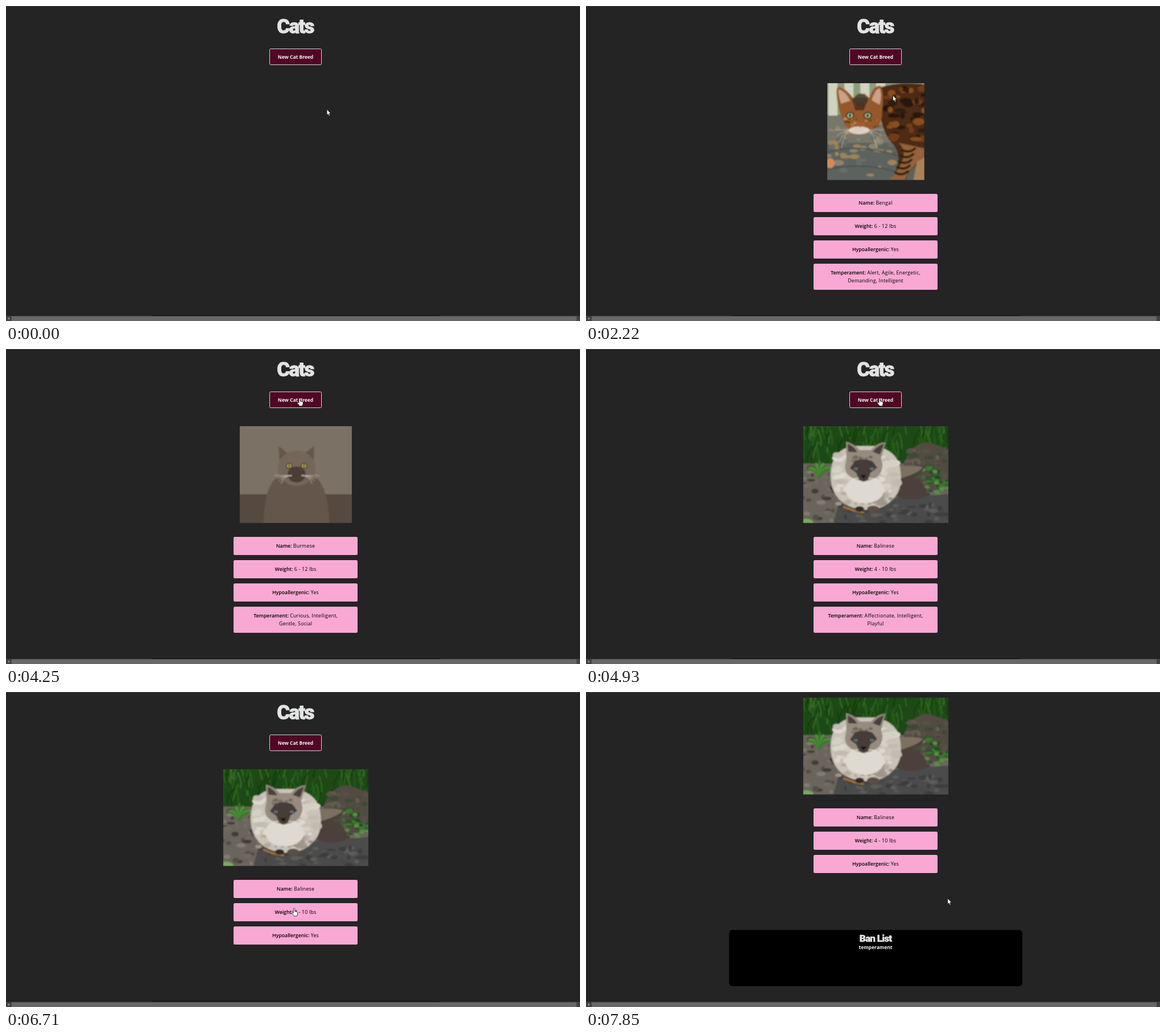
Recreate the animation shown at these times as an HTML page. Size 1009x555 px, loop 8 s.

```html
<!DOCTYPE html>
<html lang="en">
<head>
<meta charset="utf-8">
<title>Cats</title>
<style>
  html, body { margin: 0; width: 100%; height: 100%; overflow: hidden; background: #242424; }
  svg { display: block; overflow: hidden; }
  text { text-anchor: middle; font: 600 8.75px "Open Sans", "Noto Sans", sans-serif; }
  .button { font-size: 8.5px; font-weight: 700; fill: #f6f2f4; }
  .value { font-weight: 400; letter-spacing: .24px; }
  .display { font: 900 35px Roboto, sans-serif; letter-spacing: -1.7px; fill: #e2e4e4;
    stroke: #e2e4e4; stroke-width: .8; stroke-linejoin: round; }
  .small { font-size: 17px; letter-spacing: -.7px; stroke-width: .5; }
  #cursor path { fill: #fff; stroke: #111; stroke-width: .8; stroke-linejoin: round; }
</style>
</head>
<body>
<svg width="100%" height="100%" viewBox="0 0 1009 555">
  <filter id="soft"><feGaussianBlur stdDeviation=".8"/></filter>
  <rect width="1009" height="555" fill="#242424"/>
  <g id="page">
    <text class="display" x="508.5" y="47.8">Cats</text>
    <rect x="463.5" y="75.5" width="91" height="28" rx="2" fill="#500724" stroke="#d8d4d6"/>
    <text class="button" x="509" y="93">New Cat Breed</text>
    <g id="photos"></g>
    <g id="cards"></g>
    <rect x="251.5" y="545.2" width="515.5" height="99" rx="6"/>
    <text class="display small" x="509" y="565.5">Ban List</text>
    <text class="button" id="banned" x="509" y="579">temperament</text>
  </g>
  <rect width="1009" height="1" fill="#404040"/>
  <rect y="546" width="1009" height="9" fill="#424242"/>
  <rect x="10" y="546.7" width="993" height="8.3" fill="#686868"/>
  <path d="M6 548.6v4.4l-3-2.2z" fill="#9a9a9a"/>
  <g id="cursor">
    <path id="arrow" d="M0 0V10.2l2.3-2 1.5 3.5 1.8-.8-1.5-3.4h2.9z"/>
    <path id="hand" d="M-1.2 1.2a1.2 1.2 0 0 1 2.4 0V5.5l3.6.8q1.6.5 1.5 2l-.6 3q-.3 1.3-.8 2.6h-5q-.5-1.3-1.6-2.4l-2-2.3q-.8-1.2.2-1.7 .9-.4 2.3 1z"/>
  </g>
</svg>
<script>
const LOOP = 8000, STEP = 120;
const BAN_TIME = 6320, SCROLL_TIME = 7610, SCROLL_END = 126;
const $ = id => document.getElementById(id);

// Pointer strokes from its resting place: start time, steps, destination
const strokes = [
  { t: 150, n: 2, x: 539, y: 116 },
  { t: 420, n: 1, x: 520, y: 87 },
  { t: 1170, n: 2, x: 535, y: 95 },
  { t: 1860, n: 3, x: 577, y: 269 },
  { t: 2220, n: 4, x: 512, y: 76 },
  { t: 2700, n: 3, x: 511, y: 86 },
  { t: 3220, n: 1, x: 522, y: 98 },
  { t: 3860, n: 4, x: 516, y: 86.5 },
  { t: 5050, n: 3, x: 556, y: 346 },
  { t: 5690, n: 5, x: 503, y: 472 },
  { t: 6470, n: 3, x: 506.5, y: 381 },
  { t: 6830, n: 4, x: 528, y: 118 },
  { t: 7370, n: 3, x: 653.5, y: 322 },
  { t: 7730, n: 2, x: 635.7, y: 363.5 }
];

const breeds = [
  { from: 1470, photoFrom: 1590, width: 170.5, draw: bengal,
    rows: ["Bengal", "6 - 12 lbs", "Yes", "Alert, Agile, Energetic,"], more: "Demanding, Intelligent" },
  { from: 3460, photoFrom: 3460, width: 197, draw: greyCat,
    rows: ["Burmese", "6 - 12 lbs", "Yes", "Curious, Intelligent,"], more: "Gentle, Social" },
  { from: 4810, photoFrom: 4810, width: 255, draw: balinese,
    rows: ["Balinese", "4 - 10 lbs", "Yes", "Affectionate, Intelligent,"], more: "Playful" }
];
const cardTop = i => 331 + 41 * i;
const cardHeight = i => i === 3 ? 46 : 32;

const path = (d, fill) => `<path d="${d}" fill="${fill}"/>`;
const line = (d, stroke, w = 1) =>
  `<path d="${d}" fill="none" stroke="${stroke}" stroke-width="${w}" stroke-linecap="round"/>`;
const oval = (x, y, rx, ry, fill) => `<ellipse cx="${x}" cy="${y}" rx="${rx}" ry="${ry}" fill="${fill}"/>`;
const block = (x, y, w, h, fill) => `<rect x="${x}" y="${y}" width="${w}" height="${h}" fill="${fill}"/>`;
const repeat = (n, draw) => Array.from({ length: n }, (_, i) => draw(i)).join("");

function random(seed) {
  return () => (seed = seed * 16807 % 2147483647) / 2147483647;
}

// Ovals spread over a box
function scatter(seed, n, x, y, w, h, size, colours) {
  const rnd = random(seed);
  return repeat(n, i => oval(x + w * rnd(), y + h * rnd(), size * (.4 + rnd()),
    size * (.3 + rnd() / 2), colours[i % colours.length]));
}

// Both eyes, mirrored about x
const eyes = (x, y, gap, r, iris) => [-gap, gap].map(d =>
  oval(x + d, y, r * 1.4, r * 1.2, "#1d1712") + oval(x + d, y, r, r * .85, iris) +
  oval(x + d, y, r * .35, r * .6, "#111")).join("");

// Fan of whiskers on both sides
const whiskers = (x, y, reach, drop) => repeat(8, i => {
  const side = i % 2 ? 1 : -1, k = i >> 1;
  return line(`M${x + side * 9} ${y}q${side * reach / 2} 0 ${side * (reach - k * 4)} ${drop * k / 3}`, "#e4ded4", .6);
});

function bengal() {
  const ground = block(-5, 50, 185, 130, "#77766a") + block(-5, 105, 185, 70, "#5c635f") +
    scatter(5, 45, 0, 62, 120, 100, 7, ["#8d8470", "#696d66", "#a28256"]) +
    line("M0 122Q55 105 125 128M0 152Q60 138 120 156", "#4a504e", 2);
  const fence = block(-5, -5, 185, 60, "#8f9c78") +
    repeat(4, i => block(2 + i * 28, -5, 16, 62, "#cfd3bf"));
  const body = path("M88 9Q130-5 176 3V135Q143 145 136 176H107Q136 140 118 110 99 92 94 60z", "#4b2a13") +
    scatter(41, 45, 106, 8, 70, 92, 8, ["#28170d", "#713d17", "#331c0e", "#8a4d1d"]) +
    path("M125 105Q150 125 109 171H136Q145 147 171 132V115z", "#94623a") +
    repeat(5, i => line(`M${132 - i * 3} ${118 + i * 10}q12 6 22-3`, "#33200f", 4)) +
    path("M151 172L158 138 176 128V176z", "#a98259");
  const head = path("M21 48Q12 8 20 6 34 10 45 26L65 18 74 26Q82 2 94 5 101 20 96 51 98 78 70 86L47 89 30 73z", "#96592b") +
    path("M24 36Q17 12 21 11 34 16 40 31zM78 30Q84 10 92 9 97 20 92 38z", "#c9a288") +
    path("M45 29Q58 7 72 29L65 42H52z", "#54483d") +
    repeat(7, i => line(`M${44 + i * 4.5} 26L${50 + i * 2.2} 47`, "#3c2315", 1.8)) +
    scatter(8, 18, 28, 62, 62, 16, 3, ["#5f3719", "#b98a5b"]) +
    oval(56, 83, 18, 7, "#d9cfc0") + path("M49 71Q57 66 64 71L58 78z", "#a65a3b") +
    eyes(55.5, 57, 15.5, 5.2, "#a9b98c") + whiskers(56, 82, 34, 32);
  return ground + fence + oval(5, 141, 8, 9, "#d68a52") + body + head;
}

function greyCat() {
  return block(-5, -5, 210, 185, "#7b7165") + block(-5, 120, 210, 60, "#544a41") +
    path("M42 176Q42 99 72 86L68 35 88 50H111L131 35 129 85Q158 107 157 176z", "#65574c") +
    oval(100, 74, 33, 31, "#75665a") + oval(100, 85, 16, 14, "#493d36") +
    eyes(100, 70, 13, 4, "#c5b365") + whiskers(100, 87, 30, 14);
}

function balinese() {
  const rnd = random(97);
  const lawn = block(-5, -5, 265, 75, "#1b4812") + repeat(95, i =>
    line(`M${rnd() * 255} ${10 + rnd() * 60}q${rnd() * 10 - 5} -12 ${rnd() * 24 - 12} -27`,
      ["#2a651e", "#123a0c", "#386f27"][i % 3], 1 + rnd() * 1.5));
  const soil = block(-5, 66, 265, 110, "#6a655b") +
    scatter(12, 170, 0, 68, 255, 100, 6, ["#524d45", "#837b6f", "#716b61", "#403d37"]);
  const bank = path("M178 62Q192 29 220 28L260 43V112H170z", "#514b42") +
    scatter(19, 35, 185, 42, 70, 60, 7, ["#665c50", "#3d4934", "#5a5046"]);
  const leaves = repeat(9, i => line(`M28 91Q${20 + i * 2} 72 ${5 + i * 6} ${62 + Math.abs(i - 4) * 4}`,
    i % 2 ? "#4e9438" : "#39762a", 3.5)) +
    scatter(23, 32, 207, 72, 46, 55, 5, ["#347b2b", "#1e4c1b", "#54923f"]);
  const stone = path("M52 176L62 136 166 126 260 119V176z", "#4b4b4b") +
    scatter(31, 70, 66, 138, 188, 34, 6, ["#3c3d3e", "#5c5b59", "#484848"]) +
    line("M71 142Q92 151 106 152", "#a5742f", 3);
  const tail = path("M148 75Q201 64 212 70 213 82 193 91 218 103 219 121 194 138 154 120z", "#4b403a") +
    path("M158 71Q193 67 210 72 205 83 160 95z", "#7c7064");
  const body = path("M48 84Q50 40 89 35H126Q169 43 171 80 175 113 157 129 139 149 106 147 75 144 61 126 48 112 48 84z", "#c9c3b8") +
    scatter(3, 70, 56, 48, 108, 78, 9, ["#d5d0c6", "#c2bbb0", "#dcd8cf"]) +
    scatter(14, 25, 62, 118, 92, 22, 6, ["#a09588", "#b5ab9e"]) +
    oval(108, 112, 34, 24, "#dedad1") + oval(99, 146, 8, 5, "#302a29") + oval(123, 146, 11, 6, "#5a5047");
  const head = path("M76 60L75 27Q90 31 99 42H119Q130 29 145 28L137 56Q144 78 129 90 108 103 84 90 68 79 76 60z", "#968b7e") +
    path("M79 45L78 31Q89 35 95 46zM122 45Q132 33 142 31L135 50z", "#4a413a") +
    scatter(27, 22, 88, 50, 36, 20, 4, ["#6f665c", "#877b6e"]) +
    path("M91 61Q106 55 122 62L130 73 118 82 114 94Q106 101 98 94L93 82 82 74z", "#463d38") +
    eyes(106.5, 75, 14, 3.2, "#8199a6") + path("M100 86H111L106 93z", "#171413") + whiskers(106, 92, 28, 12);
  return lawn + soil + bank + leaves + stone + tail + body + head + oval(5, 171, 13, 8, "#79a860");
}

$("photos").innerHTML = breeds.map(b =>
  `<svg x="${509.4 - b.width / 2}" y="136" width="${b.width}" height="170.5"><g filter="url(#soft)">${b.draw()}</g></svg>`).join("");

$("cards").innerHTML = ["Name", "Weight", "Hypoallergenic", "Temperament"].map((label, i) => {
  const y = cardTop(i);
  return `<g><rect x="400" y="${y}" width="218" height="${cardHeight(i)}" rx="2.5" fill="#f9a8d4"/>` +
    `<text x="509" y="${y + 19}">${label}: <tspan class="value"></tspan></text>` +
    (i === 3 ? `<text class="value" id="more" x="509" y="${y + 33}"></text>` : "") + "</g>";
}).join("");

const photos = [...$("photos").children];
const cards = [...$("cards").children];
const values = cards.map(c => c.querySelector("tspan"));
const show = (el, on) => el.setAttribute("visibility", on ? "visible" : "hidden");
const latest = (t, key) => breeds.filter(b => b[key] <= t).pop();

// Fraction done of a move drawn in n equal steps
const progress = (t, start, n) =>
  t < start ? 0 : Math.min(1, (Math.floor((t - start) / STEP) + 1) / n);
const easeOut = p => 1 - (1 - p) ** 3;
const easeInOut = p => (1 - Math.cos(Math.PI * p)) / 2;

function pointer(t) {
  let x = 564, y = 182;
  for (const s of strokes) {
    const p = easeOut(progress(t, s.t, s.n));
    x += (s.x - x) * p;
    y += (s.y - y) * p;
  }
  return [x, y];
}

function render(t) {
  const current = latest(t, "from"), pictured = latest(t, "photoFrom");
  const banned = t >= BAN_TIME;
  const scroll = SCROLL_END * easeInOut(progress(t, SCROLL_TIME, 3));
  const [x, y] = pointer(t);
  const pageY = y + scroll;
  const visible = i => !!current && !(banned && i === 3);

  photos.forEach((p, i) => show(p, breeds[i] === pictured));
  cards.forEach((c, i) => {
    show(c, visible(i));
    values[i].textContent = current ? current.rows[i] : "";
  });
  $("more").textContent = current ? current.more : "";
  show($("banned"), banned);
  $("page").setAttribute("transform", `translate(0 ${-scroll})`);

  const onButton = x >= 463 && x <= 555 && pageY >= 75 && pageY <= 104;
  const onCard = x >= 400 && x <= 618 && cards.some((_, i) =>
    visible(i) && pageY >= cardTop(i) && pageY <= cardTop(i) + cardHeight(i));
  show($("hand"), onButton || onCard);
  show($("arrow"), !(onButton || onCard));
  $("cursor").setAttribute("transform", `translate(${x} ${y})`);
}

const begin = performance.now();
function tick() {
  render((performance.now() - begin) % LOOP);
  requestAnimationFrame(tick);
}
render(0);
requestAnimationFrame(tick);
</script>
</body>
</html>
```
